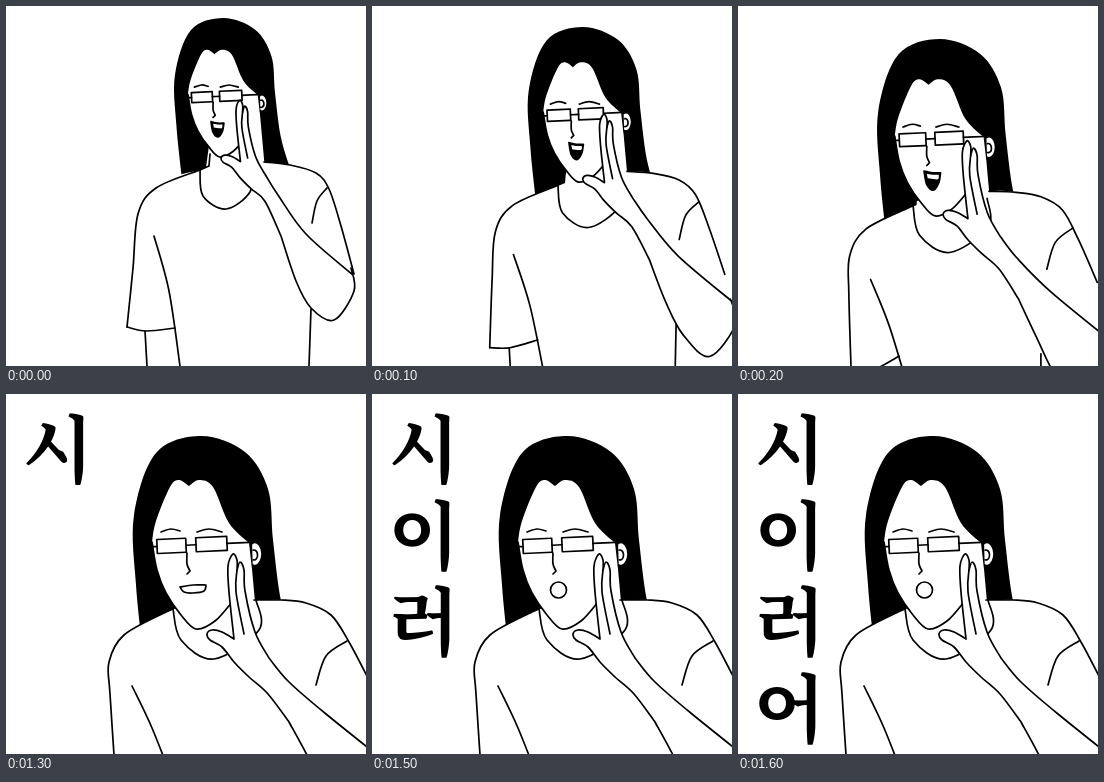
These frames come from a looping animation (360x360 px, 2600 ms). An HTML page with a canvas:

```html
<!DOCTYPE html>
<html lang="ko">
<head>
<meta charset="utf-8">
<style>
  html, body { margin: 0; overflow: hidden; background: #fff; }
  canvas { display: block; }
</style>
</head>
<body>
<canvas id="stage" width="360" height="360"></canvas>
<script>
const ctx = document.getElementById('stage').getContext('2d');
const LOOP = 2600;
const STEP = 100;

// Points "x,y x,y" form a smooth curve; a slash marks a corner.
const parse = text => text.split(' / ').map(
  part => part.split(' ').map(pair => pair.split(',').map(Number)));

// Head, measured from the bridge of the glasses.
const jaw = parse('-39,-3 -34,25 -25,48 -10,70 5,84 24,76 41,57');
const hair = [
  ...parse('-48,108 -55,40 -57,-30 -35,-92 10,-109 54,-93 77,-56 82,-5 90,56 103,100 / 68,100 / 61,24 / 58,-2'),
  ...parse('38,-22 22,-58 8,-65 -2,-59 / -12,-65 -21,-58 -35,-24 -39,-3'),
  jaw[0].slice(1, 4),
  ...parse('-14,100 / -48,108')
];
const nose = parse('-4,8 -4,19 -1,26 / -4,29');
const brows = [parse('-30,-13 -20,-16 -11,-14'), parse('6,-13 18,-16 31,-13')];
const shout = parse('-7,35 2,37 11,37 / 9,48 3,56 -4,50 -7,35');
const teeth = parse('-4,38 2,39 9,39 / 8,44 -3,43');
const flat = parse('-11,42 2,40 15,40 / 13,46 2,48 -7,47 -11,42');

// Hand, measured from the tip of the thumb.
const hand = parse('61,60 42,43 27,28 15,13 3,6 0,0 5,-4 15,-2 27,5 / ' +
  '22,-42 21,-68 26,-80 30,-74 30,-64 / 33,-72 37,-64 38,-43 48,-2 62,24');
const finger = parse('30,-64 29,-42 37,0');

// Body parts: standing upright, then leaning forward.
const pair = (upright, leaning) => [parse(upright), parse(leaning)];
const body = {
  left: pair('121,321 127,262 132,208 150,182 194,164 / 203,160 / 204,148',
    '110,390 104,300 103,268 118,241 160,218 / 167,215 / 167,215'),
  collar: pair('194,164 197,190 220,203 244,186 247,160',
    '167,215 175,246 208,265 253,236 250,206'),
  hem: pair('121,321 140,325 169,322', '110,390 133,381 158,362'),
  sleeve: pair('148,230 163,285 174,360', '126,292 146,334 168,390'),
  arm: pair('139,325 / 141,360', '133,382 / 135,420')
};
const rightSide = {
  shoulder: pair('258,156 284,159 310,167 323,183 335,220 348,268',
    '248,206 275,206 300,209 325,221 343,248 364,288'),
  fold: pair('321,182 311,195 306,217', '341,247 320,262 310,291'),
  waist: pair('305,303 / 303,360', '302,375 / 303,420'),
  elbow: pair('345,262 348,285 328,314 305,302 290,275 275,230',
    '390,385 400,415 360,455 325,410 302,363 283,328'),
  forearm: pair('272,189 300,228 347,269', '283,288 320,320 395,380')
};

const lerp = (a, b, t) => a + (b - a) * t;
const mapPoints = (curve, move) => curve.map(part => part.map(move));

function mix([upright, leaning], t, lift = 0) {
  return upright.map((part, i) => part.map(([x, y], j) => {
    const [endX, endY] = leaning[i][j];
    return [lerp(x, endX, t), lerp(y, endY, t) - lift];
  }));
}

function trace(curve) {
  const path = new Path2D();
  let last;
  for (const part of curve) {
    const p = last ? [last, ...part] : part;
    if (!last) path.moveTo(...p[0]);
    for (let i = 0; i < p.length - 1; i++) {
      const [a, b, c, d] = [p[i - 1] || p[i], p[i], p[i + 1], p[i + 2] || p[i + 1]];
      path.bezierCurveTo(
        b[0] + (c[0] - a[0]) / 6, b[1] + (c[1] - a[1]) / 6,
        c[0] - (d[0] - b[0]) / 6, c[1] - (d[1] - b[1]) / 6, ...c);
    }
    last = p[p.length - 1];
  }
  return path;
}

function fill(curve, color) {
  ctx.fillStyle = color;
  ctx.fill(trace(curve));
}

const stroke = curve => ctx.stroke(trace(curve));

function oval(x, y, rx, ry, from = 0, to = 2 * Math.PI) {
  ctx.beginPath();
  ctx.ellipse(x, y, rx, ry, 0, from, to);
  ctx.fillStyle = '#fff';
  ctx.fill();
  ctx.stroke();
}

function drawGlasses() {
  ctx.save();
  ctx.rotate(-.045);
  ctx.strokeRect(-34, -7, 29, 14);
  ctx.strokeRect(5, -7, 31, 14);
  for (const [from, to] of [[-40, -34], [-5, 5], [36, 59]]) stroke([[[from, 0], [to, 0]]]);
  ctx.restore();
}

function drawMouth(kind) {
  if (kind === 'round') return oval(1.5, 45, 8, 8);
  if (kind === 'flat') return stroke(flat);
  fill(shout, '#000');
  fill(teeth, '#fff');
  stroke(shout);
}

function drawFace(mouth) {
  oval(64, 9, 7, 11.5, -2, 1.9);
  oval(63, 10, 3.5, 5, -1.8, 1.8);
  [jaw, nose, ...brows].forEach(stroke);
  drawGlasses();
  drawMouth(mouth);
}

function drawFigure(t, mouth) {
  const scale = lerp(.72, 1, t);
  const lift = 7 * Math.sin(Math.PI * t);
  const left = mix(body.left, t);
  const right = name => mix(rightSide[name], t, lift);
  const inHead = paint => {
    ctx.save();
    ctx.translate(lerp(210, 185, t), lerp(90.5, 151, t));
    ctx.scale(scale, scale);
    ctx.lineWidth /= scale;
    paint();
    ctx.restore();
  };
  const toHand = ([x, y]) =>
    [lerp(215, 201, t) + x * scale, lerp(152, 240, t) - lift + y * scale];

  inHead(() => fill(hair, '#000'));
  fill([...left, ...right('shoulder')], '#fff');
  for (const part of Object.values(body)) stroke(mix(part, t));
  ['shoulder', 'fold', 'waist'].forEach(name => stroke(right(name)));
  inHead(() => drawFace(mouth));

  const arm = [...right('elbow'), ...mapPoints(hand, toHand), ...right('forearm')];
  fill(arm, '#fff');
  stroke(arm);
  stroke(mapPoints(finger, toHand));
}

function draw(now) {
  const step = Math.floor(now % LOOP / STEP);
  const k = Math.min(1, step / 3);
  const lean = k - .04 * Math.sin(2 * Math.PI * k);
  const count = Math.max(0, Math.min(4, step - 12));
  const mouth = ['shout', 'flat', 'flat', 'round', 'round'][count];

  ctx.fillStyle = '#fff';
  ctx.fillRect(0, 0, 360, 360);
  ctx.lineWidth = 1.7;
  ctx.lineCap = ctx.lineJoin = 'round';
  drawFigure(lean, mouth);

  ctx.fillStyle = '#000';
  ctx.font = 'bold 74px "Noto Serif CJK KR", "Noto Sans CJK KR", "Noto Sans CJK", serif';
  [...'시이러어'].slice(0, count).forEach((letter, i) => ctx.fillText(letter, 16, 83 + i * 86.2));
}

let start;
function tick(now) {
  start ??= now;
  draw(now - start);
  requestAnimationFrame(tick);
}
requestAnimationFrame(tick);
</script>
</body>
</html>
```
